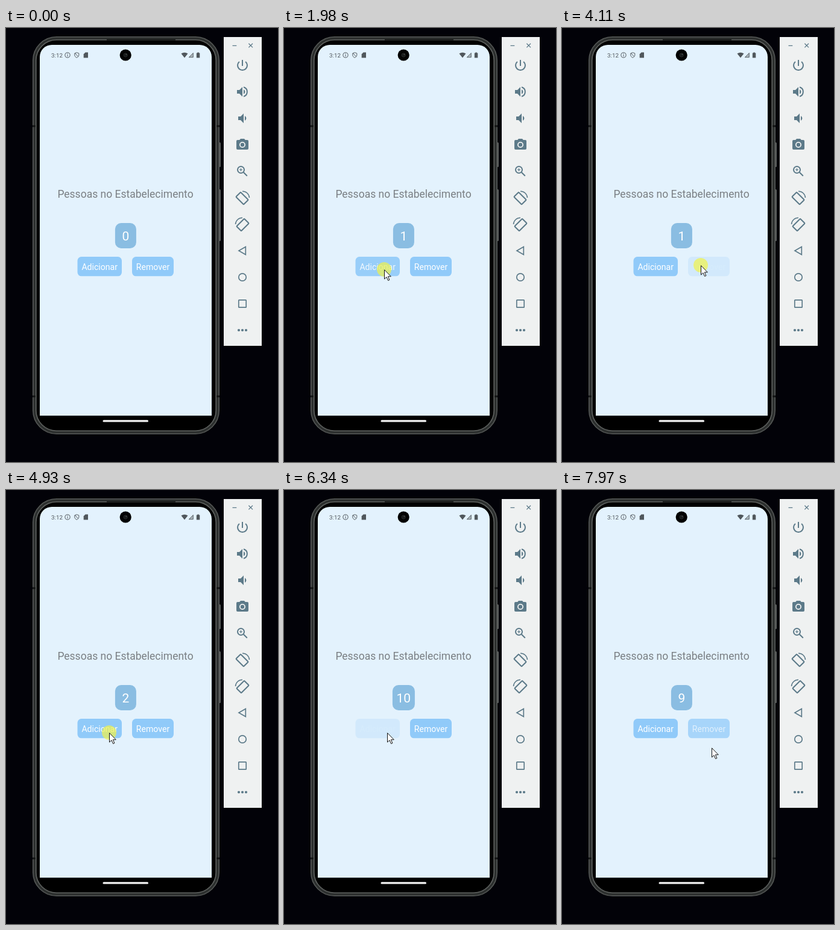
These frames come from a looping animation (451 by 721 pixels, 8000 ms). An HTML page:

```html
<!DOCTYPE html>
<html lang="pt">
<head>
<meta charset="utf-8">
<title>Pessoas no Estabelecimento</title>
<style>
html, body { margin: 0; width: 100%; height: 100%; overflow: hidden; background: #020208; }
svg { display: block; }
text { font-family: Roboto, "Open Sans", sans-serif; }
.mid { text-anchor: middle; }
.line { fill: none; stroke: #5c7a89; stroke-width: 2; }
.fill { fill: #5c7a89; }
</style>
</head>
<body>
<svg width="451" height="721" viewBox="0 0 451 721">
  <defs>
    <g id="turn">
      <rect x="-9" y="-5.5" width="18" height="11" rx="1" transform="translate(-.5 1) rotate(45)"/>
      <path d="M0-10.8A11.5 11.5 0 0 1 11.5 0" stroke-width="1.5"/>
    </g>
  </defs>
  <rect width="451" height="721" fill="#020208"/>

  <!-- phone body -->
  <g fill="#5c5f5d">
    <rect x="352" y="190" width="4" height="41" rx="1.5"/>
    <rect x="352" y="268" width="4" height="86" rx="1.5"/>
  </g>
  <rect x="44.8" y="14.8" width="308.4" height="659.4" rx="39" fill="#2c2f2e" stroke="#555856" stroke-width="1.6"/>
  <rect x="49.8" y="19.8" width="298.4" height="649.4" rx="34" fill="#000" stroke="#606361" stroke-width="1.6"/>
  <path d="M167 19.5H281" stroke="#161817" stroke-width="2"/>
  <path d="M44 163h5M349 163h5M44 612h5M349 612h5" stroke="#141615" stroke-width="3"/>
  <path d="M56 644V48a20 20 0 0 1 20-20H321a20 20 0 0 1 20 20V644z" fill="#e3f2fd"/>
  <rect x="160.5" y="651.3" width="75.5" height="3.2" rx="1.6" fill="#f4f4f4"/>
  <circle cx="198.2" cy="45" r="9.6" fill="#020202"/>
  <circle cx="198.2" cy="45" r="3.2" fill="#161818" stroke="#303433" stroke-width=".7"/>
  <circle cx="199.3" cy="44" r=".9" fill="#4b504e"/>

  <!-- status bar -->
  <g fill="#50575c">
    <text x="75" y="48.6" font-size="9.8">3:12</text>
    <g fill="none" stroke="#50575c">
      <circle cx="102" cy="45" r="4.1"/>
      <path d="M102 44.3v3M102 42.4v1.1"/>
      <path d="M117.3 40.8l3.5 1.3v2.7c0 2-1.4 3.6-3.5 4.5-2.1-.9-3.5-2.5-3.5-4.5v-2.7zM114.5 42l5.5 6"/>
    </g>
    <path d="M131.6 40.6h4.4v8.8h-7.3v-6z"/>
    <path d="M290.5 42.6q5.5-3.6 11 0l-5.5 6.9z"/>
    <path d="M303.3 48.7h7v-7.2z" fill="#a9b4bb" stroke="#50575c" stroke-width=".9"/>
    <path d="M317.4 40.6h2.4v1h1.5v7.9h-5.4v-7.9h1.5z"/>
  </g>

  <!-- app -->
  <text id="title" class="mid" x="198" y="281.5" font-size="17.5" fill="#7a7f83">Pessoas no Estabelecimento</text>
  <g id="count">
    <rect y="324" height="42" rx="10" fill="#8abde2"/>
    <text class="mid" x="198.3" y="353.2" font-size="21" fill="#fff"></text>
  </g>
  <g id="row">
    <g id="add">
      <rect x="118.5" y="380" width="73.5" height="32.3" rx="6.5" fill="#90caf9"/>
      <text class="mid" x="155.2" y="401.7" font-size="14.1" fill="#fff">Adicionar</text>
    </g>
    <g id="sub">
      <rect x="209" y="380" width="69" height="32.3" rx="6.5" fill="#90caf9"/>
      <text class="mid" x="243.5" y="401.7" font-size="14.1" fill="#fff">Remover</text>
    </g>
  </g>

  <!-- side toolbar -->
  <rect x="361" y="15" width="63" height="513" fill="#eff1f1"/>
  <path class="line" style="stroke-width:1.3" d="M375.5 29.3h6.8M402.4 25.8l6.6 6.6M409 25.8l-6.6 6.6"/>
  <path class="line" transform="translate(392 62)" d="M0-9V1M-5.1-6.1A8 8 0 1 0 5.1-6.1"/>
  <g transform="translate(392 106)">
    <path class="fill" d="M-9-3v6h4l5 5V-8l-5 5zM2-4v8a4.5 4.5 0 0 0 0-8z"/>
    <path class="line" d="M2-7.7a8 8 0 0 1 0 15.4"/>
  </g>
  <path class="fill" transform="translate(392 150)" d="M-7-3v6h4l5 5V-8l-5 5zM4-4v8a4.5 4.5 0 0 0 0-8z"/>
  <g class="fill" transform="translate(392 194)">
    <path d="M-3-10h6l1.8 2H8a2 2 0 0 1 2 2V6a2 2 0 0 1-2 2H-8a2 2 0 0 1-2-2V-6a2 2 0 0 1 2-2h3.2z"/>
    <circle r="4.1" fill="none" stroke="#eff1f1" stroke-width="1.8"/>
  </g>
  <g class="line" transform="translate(392 238)">
    <circle cx="-2.5" cy="-2.5" r="5.5"/>
    <path d="M1.8 1.8L7.8 7.8"/>
    <path d="M-5-2.5h5M-2.5-5v5" stroke-width="1.2"/>
  </g>
  <use href="#turn" class="line" transform="translate(392 282)"/>
  <use href="#turn" class="line" transform="translate(392 326) scale(-1 1)"/>
  <g class="line" style="stroke-width:1.7">
    <path d="M386 370l11.3-6.6v13.2z"/>
    <circle cx="392" cy="414" r="6.2"/>
    <rect x="385.8" y="451.8" width="12.4" height="12.4" rx=".8"/>
  </g>
  <path d="M386 502h.01M392 502h.01M398 502h.01" stroke="#5c7a89" stroke-width="4.2" stroke-linecap="round"/>

  <!-- pointer -->
  <g id="mouse">
    <circle id="halo" r="12" fill="#f0f24a" opacity=".7"/>
    <path d="M.5.7V16l3.5-3.3 2.6 5.8 2.3-1-2.5-5.7h4.9z" fill="#fff" stroke="#111"/>
  </g>
</svg>
<script>
const LOOP = 8000, LIMIT = 10;
const $ = id => document.getElementById(id);
const [title, count, row, add, sub, mouse, halo] =
  ["title", "count", "row", "add", "sub", "mouse", "halo"].map($);
const [badge, digits] = count.children;

// pointer moves; sag bends the way downwards
const moves = [
  { from: 130, to: 550, x: 277, y: 248, sag: 0 },
  { from: 750, to: 1440, x: 166, y: 401, sag: 90 },
  { from: 2920, to: 3120, x: 230, y: 394, sag: 0 },
  { from: 4290, to: 4570, x: 171, y: 403, sag: 0 },
  { from: 7430, to: 7700, x: 248, y: 428, sag: 0 }
];

// evenly spaced clicks from first to last; the button dims and lights up again
const bouts = [
  { button: add, step: 1, n: 7, first: 1850, last: 2900, dim: 1968, lit: 3007 },
  { button: sub, step: -1, n: 7, first: 3230, last: 4180, dim: 3190, lit: 4180 },
  { button: add, step: 1, n: 10, first: 4720, last: 6260, dim: 4930, lit: 6900 },
  { button: sub, step: -1, n: 1, first: 7850, last: 7850, dim: 7935, lit: LOOP }
];
const fullAt = 6410;
const freeAt = bouts[3].first;

const clamp = v => Math.min(1, Math.max(0, v));
const smooth = u => u * u * (3 - 2 * u);
const slide = (el, y) => el.setAttribute("transform", `translate(0 ${y})`);

function pointer(t) {
  let x = 397, y = 712;
  for (const m of moves) {
    const u = smooth(clamp((t - m.from) / (m.to - m.from)));
    x += (m.x - x) * u;
    y += (m.y - y) * u + m.sag * Math.sin(Math.PI * u);
  }
  return [x, y];
}

function opacity(button, t) {
  const dips = bouts.filter(b => b.button === button)
    .map(b => clamp((t - b.dim) / 100) - smooth(clamp((t - b.lit) / 280)));
  return 1 - .8 * Math.max(...dips);
}

function clicking(t) {
  let total = 0, down = false;
  for (const b of bouts) {
    const gap = (b.last - b.first) / (b.n - 1) || 140;
    const pos = (t - b.first) / gap + 1;
    total += b.step * Math.max(0, Math.min(b.n, Math.floor(pos)));
    if (pos > 0 && pos < b.n && pos % 1 > .2) down = true;
  }
  return { total, down };
}

function draw(t) {
  const { total, down } = clicking(t);
  const shift = t >= fullAt && t < freeAt ? 24 : 0;
  const wide = total < LIMIT ? 35 : 37;
  digits.textContent = total;
  badge.setAttribute("x", 198.4 - wide / 2);
  badge.setAttribute("width", wide);
  slide(title, -shift);
  slide(count, shift);
  slide(row, shift);

  for (const button of [add, sub]) {
    const k = opacity(button, t);
    button.setAttribute("opacity", k);
    button.lastElementChild.setAttribute("opacity", k);
  }

  const [x, y] = pointer(t);
  mouse.setAttribute("transform", `translate(${x.toFixed(1)} ${y.toFixed(1)})`);
  mouse.setAttribute("visibility", t < moves[0].from ? "hidden" : "visible");
  halo.setAttribute("display", down ? "inline" : "none");
}

const start = performance.now();
function tick() {
  draw((performance.now() - start) % LOOP);
  requestAnimationFrame(tick);
}
draw(0);
requestAnimationFrame(tick);
</script>
</body>
</html>
```
